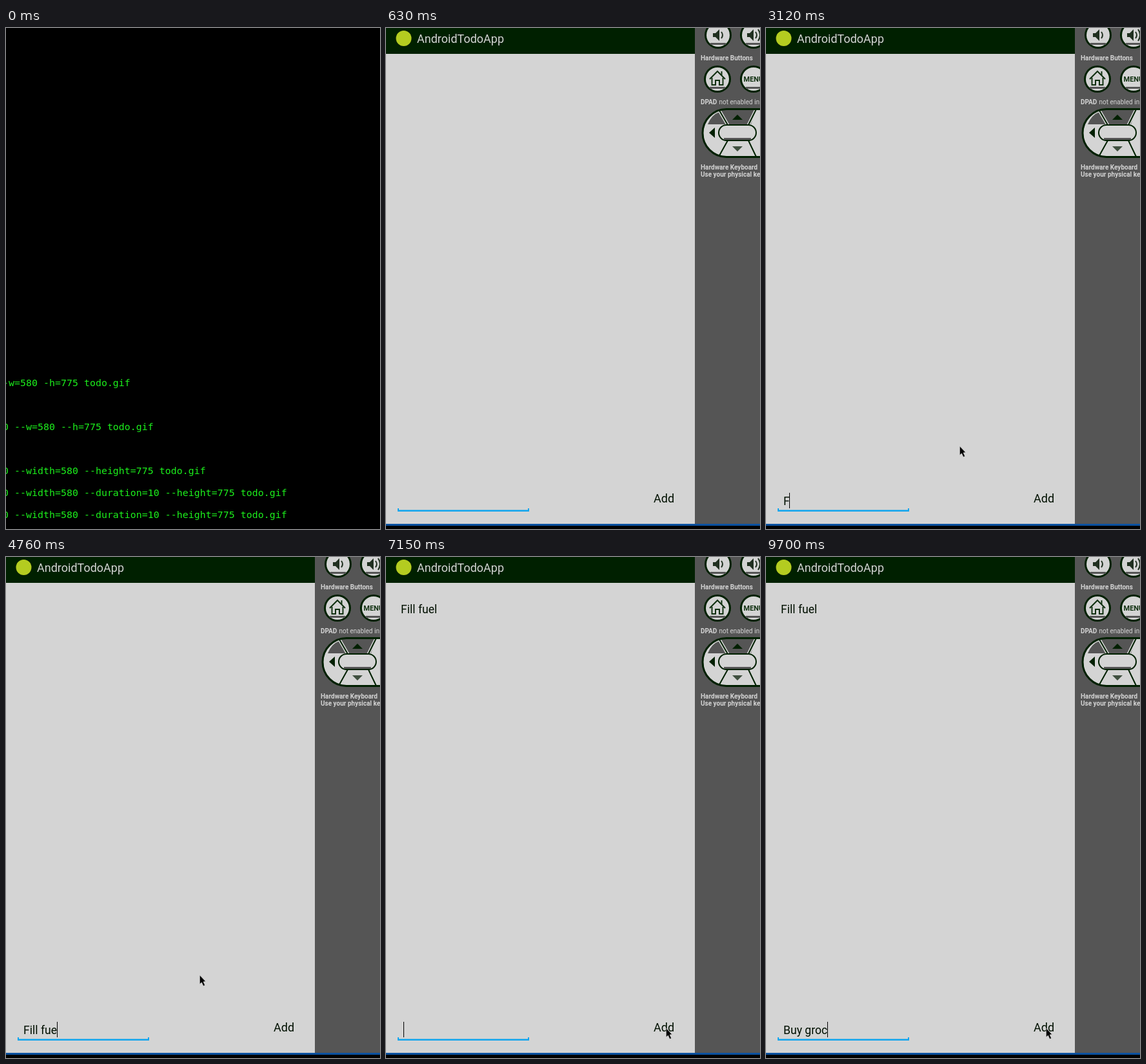
Recreate the animation shown at these times as an HTML page with a canvas. Size 580 by 775 pixels, loop 9790 ms.

```html
<!DOCTYPE html>
<html lang="en">
<head>
<meta charset="utf-8">
<title>Todo app demo</title>
<style>
  html, body { margin: 0; width: 100%; height: 100%; overflow: hidden; background: #000; }
  canvas { display: block; }
</style>
</head>
<body>
<canvas id="stage" width="580" height="775"></canvas>
<script>
const ctx = document.getElementById('stage').getContext('2d');
const LOOP = 9790;
const LIGHT = '#d4d4d4', GREY = '#555', DARK = '#002000', INK = '#001000', BLUE = '#55aaff';
const FIELD_FONT = '17.6px Roboto, sans-serif';

// [time, field text]
const typing = [
  [0, ''], [3120, 'F'], [3280, 'Fi'], [3440, 'Fil'], [3600, 'Fill'], [3750, 'Fill '],
  [4430, 'Fill f'], [4600, 'Fill fu'], [4760, 'Fill fue'], [4930, 'Fill fuel'], [6050, ''],
  [7560, 'B'], [7770, 'Bu'], [7980, 'Buy'], [8180, 'Buy '], [8390, 'Buy g'], [8600, 'Buy gr'],
  [8780, 'Buy gro'], [8950, 'Buy groc'], [9370, 'Buy grocr'], [9700, 'Buy groc']
];
// [start, end] of the spans in which the caret is hidden
const caretOff = [[630, 780], [1270, 1770], [2270, 2770], [4250, 4430], [5430, 5930], [6050, 6190], [6650, 7150]];
// [time, x, y] of the pointer tip
const pointerPath = [
  [1130, 574, 165], [1300, 475, 330], [1480, 365, 535], [1620, 312, 625], [1720, 300, 647],
  [5330, 302, 648], [5480, 350, 680], [5660, 425, 718], [5760, 449, 724], [5900, 434, 729]
];

function rect(x, y, w, h, color) {
  ctx.fillStyle = color;
  ctx.fillRect(x, y, w, h);
}

function circle(x, y, r, color) {
  ctx.beginPath();
  ctx.arc(x, y, r, 0, Math.PI * 2);
  ctx.fillStyle = color;
  ctx.fill();
}

function path(d, fill, stroke, width = 1) {
  const p = new Path2D(d);
  if (fill) { ctx.fillStyle = fill; ctx.fill(p); }
  if (stroke) { ctx.strokeStyle = stroke; ctx.lineWidth = width; ctx.stroke(p); }
}

function text(str, x, y, font, color) {
  ctx.font = font;
  ctx.fillStyle = color;
  ctx.fillText(str, x, y);
}

function drawTerminal() {
  rect(0, 0, 580, 775, '#000');
  [
    ['-w=580 -h=775 todo.gif', 554],
    ['0 --w=580 --h=775 todo.gif', 622],
    ['0 --width=580 --height=775 todo.gif', 690],
    ['0 --width=580 --duration=10 --height=775 todo.gif', 724],
    ['0 --width=580 --duration=10 --height=775 todo.gif', 758]
  ].forEach(([line, y]) => text(line, -5, y, '14.95px "DejaVu Sans Mono", monospace', '#1cf01c'));
}

function drawSwitcher() {
  rect(0, 0, 1, 766, LIGHT);
  rect(0, 765, 580, 1, LIGHT);
  rect(0, 766, 580, 3, '#000');
  rect(0, 769, 580, 1, LIGHT);

  rect(0, 266, 337, 147, LIGHT);
  rect(0, 267, 336, 145, '#55a0e8');
  rect(0, 270, 333, 139, LIGHT);
  text('SIMULATOR9 HUM', 16, 297, 'bold 18px "DejaVu Sans", sans-serif', '#003000');
  text('5554:AVD_for_5_1in_WVGA', 7, 398, '15px "DejaVu Sans", sans-serif', '#103010');

  rect(0, 314, 15, 58, '#1058a8');
  rect(0, 315, 14, 56, BLUE);
  circle(-13, 343, 21, '#d4d45a');

  path('M27.5 359.5V326.5L29.5 324.5H41.5L44.5 330.5H68.5V359.5Z', LIGHT, '#55aaaa');
  path('M28 348L68 343V359H28Z', BLUE);
  path('M27.5 331V359.5H68.5V331', null, '#1070c8');
  circle(110, 343, 21.5, '#ff5500');
  circle(172, 342.5, 21, '#d4d42a');
  ctx.setLineDash([1, 1]);
  path('M212.5 325.5H255.5V360.5H212.5Z', null, '#103010');
  ctx.setLineDash([]);
  rect(215, 328, 38, 4, '#aaa');
  rect(278, 319, 36, 48, '#6b846b');
}

function hardwareButton(x, y) {
  circle(x, y, 21, DARK);
  circle(x, y, 18, LIGHT);
  rect(x - 12, y + 12, 24, 3, GREY);
}

function speaker(x) {
  path(`M${x} 8h4l6-6v18l-6-6h-4Z`, '#203020');
  path(`M${x + 13} 6q4 5 0 10`, null, '#203020', 2);
}

function drawPad() {
  const shape = 'M528 125.5H620V199.5H528A37 37 0 0 1 528 125.5Z';
  path(shape, LIGHT);
  ctx.save();
  ctx.clip(new Path2D(shape));
  path('M499 149Q505 134 517 130V126H574L566 149Z', GREY);
  const spokes = 'M516 126L530 150M574 126L562 150M530 174L516 199M562 174L574 199';
  path(spokes, null, LIGHT, 5);
  path(spokes, null, DARK, 2);
  ctx.restore();
  path(shape, null, DARK, 3);

  ctx.beginPath();
  ctx.roundRect(516, 150, 58, 24, 12);
  ctx.fillStyle = LIGHT;
  ctx.fill();
  ctx.strokeStyle = DARK;
  ctx.lineWidth = 2;
  ctx.stroke();
  rect(524, 170, 42, 3, GREY);
  path('M501 162L510 154V170Z', DARK);
  path('M537 142L545 134L553 142Z', DARK);
  path('M537 183H553L545 191Z', '#405040');
}

function drawHardwarePanel() {
  const bold = 'bold 10px Roboto, sans-serif';
  rect(479, 0, 101, 767, GREY);
  hardwareButton(515, 11);
  hardwareButton(570, 11);
  speaker(507);
  speaker(560);
  path('M577 2q6 9 0 18', null, '#203020', 2);

  text('Hardware Buttons', 488, 50, bold, LIGHT);
  hardwareButton(514, 79);
  hardwareButton(570, 79);
  path('M502 79L514 67L526 79M505.5 77V88H511V81H517V88H522.5V77M520.5 73V67', null, '#103010', 2);
  text('MENU', 554.5, 83, 'bold 11px Roboto, sans-serif', '#103010');

  text('DPAD', 488, 118, bold, LIGHT);
  text('not enabled in AVD', 516.5, 118, '10px Roboto, sans-serif', LIGHT);
  drawPad();
  text('Hardware Keyboard', 488, 219, bold, LIGHT);
  text('Use your physical keyboard', 488, 230, bold, LIGHT);
}

function drawApp(t) {
  rect(0, 0, 580, 775, '#000');
  rect(0, 0, 479, 767, LIGHT);
  rect(0, 0, 479, 40, DARK);
  circle(27.5, 16, 12, '#b4cc20');
  text('AndroidTodoApp', 48, 23, '18px Roboto, sans-serif', LIGHT);
  drawHardwarePanel();
  rect(0, 767, 580, 3, '#0a509f');

  if (t >= 6050) text('Fill fuel', 23, 87, FIELD_FONT, INK);
  text('Add', 415, 734, '18px Roboto, sans-serif', INK);
  rect(18, 745.5, 204, 2.5, '#10a5ee');
  rect(18, 743, 2, 5, '#10a5ee');
  rect(220, 743, 2, 5, '#10a5ee');

  const value = typing.findLast(([start]) => t >= start)[1];
  text(value, 27, 738, FIELD_FONT, INK);
  if (!caretOff.some(([start, end]) => t >= start && t < end)) {
    rect(27 + Math.floor(ctx.measureText(value).width), 719, 1, 24, '#000');
  }
}

function drawPointer(t) {
  if (t < pointerPath[0][0]) return;
  const now = 1130 + Math.floor((t - 1130) / 42) * 42;
  const i = pointerPath.findLastIndex(([start]) => now >= start);
  const [t0, x0, y0] = pointerPath[i];
  const [t1, x1, y1] = pointerPath[i + 1] || [t0 + 1, x0, y0];
  // The pointer rests between its two trips
  const k = t1 - t0 > 1000 ? 0 : Math.min(1, (now - t0) / (t1 - t0));
  ctx.save();
  ctx.translate(Math.round(x0 + (x1 - x0) * k), Math.round(y0 + (y1 - y0) * k));
  path('M.5 0V13.5L3.5 11L6 16.5L8.5 15.5L6 10L9.5 9.5Z', '#000', LIGHT, .5);
  ctx.restore();
}

function frame(now) {
  const t = now % LOOP;
  if (t < 630) {
    drawTerminal();
    if (t >= 530) drawSwitcher();
  } else {
    drawApp(t);
    drawPointer(t);
  }
  requestAnimationFrame(frame);
}
requestAnimationFrame(frame);
</script>
</body>
</html>
```
